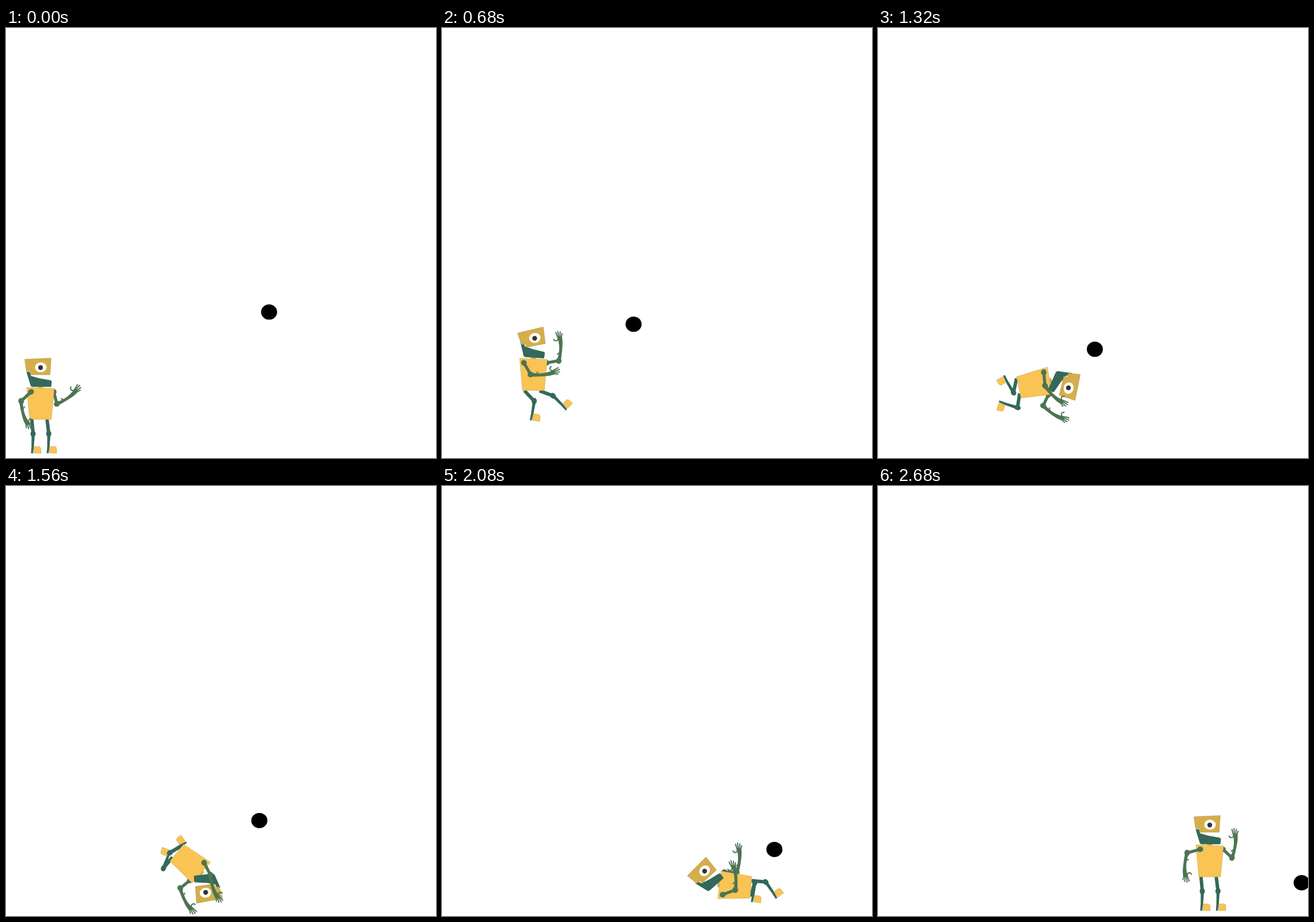
These frames come from a looping animation (748x748 px, 2720 ms). An HTML page:

```html
<!DOCTYPE html>
<html lang="en">
<head>
<meta charset="utf-8">
<title>Robot header</title>
<style>
html, body { margin: 0; width: 100%; height: 100%; overflow: hidden; background: #fff; }
svg { display: block; width: 100%; height: 100%; }
.arm { fill: #4d7452; }
.leg { fill: #34695a; }
.gold { fill: #f9c454; stroke: #b5a36c; stroke-width: .5; }
.head { fill: #d5ae4a; stroke: #a08c58; stroke-width: .5; }
.finger { fill: none; stroke: #4d7452; stroke-width: 2; stroke-linecap: round; stroke-linejoin: round; }
</style>
</head>
<body>
<svg viewBox="0 0 748 748">
  <defs>
    <g id="upper" class="arm">
      <ellipse rx="5.2" ry="4.8"/>
      <path d="M0-2.6H22V2.6H0z"/>
    </g>
    <g id="fore">
      <path class="arm" d="M-1-3.5Q8-1 12-.4L10-3 11.5-4 14.5 0Q24 1.2 34-1.2L40-3.5 43-1 42 4.5Q34 6.6 24 5.8Q8 5-2 3z"/>
      <ellipse class="arm" rx="5.4" ry="4.8"/>
      <path class="finger" d="M39-2L45-4.5 49-6M40-.5L46-1.8 51-2.6M41 1.5L46 1.4 50 1.6M40 3.5L44 4.2 47 5M38-1.5Q33-4 35-8L37-9.5"/>
    </g>
    <path id="thigh" class="leg" d="M-1-3H23V3H-1z"/>
    <g id="shin">
      <path class="leg" d="M0-3L23-2.2 34-.8V2.4L22 2 0 2.6z"/>
      <ellipse class="leg" rx="5.5" ry="4.5"/>
      <path class="gold" d="M22-2.2L21.6-11Q22-14 25.5-14.6L33.5-15V-2z"/>
    </g>
  </defs>
  <g id="robot"></g>
  <ellipse id="ball" rx="14" ry="13.3"/>
</svg>
<script>
const LOOP = 2720, STEP = 40, HIT = 960, NS = "http://www.w3.org/2000/svg";
const robot = document.getElementById("robot"), ball = document.getElementById("ball");

// Key poses. body: x, y, turn. neck: jaw tilt, head tilt.
// Limbs: direction of both halves, measured from the torso.
const legs = { nearLeg: [85, 92], farLeg: [83, 92] };
const level = { neck: [0, 0] };
const poses = [
  { t: 0, body: [60, 654, 0], ...level, ...legs, nearArm: [137, 73], farArm: [75, -36] },
  { t: 320, body: [60, 669, 0], ...level, nearLeg: [14, 102], farLeg: [17, 92], nearArm: [167, 55], farArm: [165, 61] },
  { t: 560, body: [118, 650, 8], nearLeg: [107, 102], farLeg: [62, 87] },
  { t: 680, body: [159, 603.5, 0], neck: [4, -11], nearLeg: [47, 99], farLeg: [20, 45], nearArm: [60, -7], farArm: [-10, -89] },
  { t: HIT, body: [214, 560, 16] },
  { t: 1080, body: [224.5, 584, 27], neck: [29, 9], nearLeg: [28, 126], farLeg: [41, 77], nearArm: [79, -12], farArm: [63, -25] },
  { t: 1560, body: [318, 655, 129], neck: [44, 43], nearLeg: [20, 197], farLeg: [0, 162], nearArm: [-66, -58], farArm: [12, -67] },
  { t: 2080, body: [510.5, 696, 274.4], neck: [44, 43], nearLeg: [12, 183], farLeg: [91, 141], nearArm: [65, -10], farArm: [88, 0] },
  { t: 2400, body: [577, 653, 360], ...level, ...legs },
  { t: LOOP - STEP, nearArm: [165, 93], farArm: [43, -83] }
];

function part(markup) {
  const g = document.createElementNS(NS, "g");
  g.innerHTML = markup;
  return robot.appendChild(g);
}
const use = id => part(`<use href="#${id}"/>`);
const arm = (name, x, y, size) => ({ name, x, y, size, a: use("upper"), b: use("fore") });
const leg = (name, x, y) => ({ name, x, y, size: 24, a: use("thigh"), b: use("shin") });

// Back to front
const limbs = [arm("farArm", 23, -21, 21.5), leg("farLeg", 11.5, 28), leg("nearLeg", -15, 28)];
const torso = part('<path class="head" d="M-4-31H4V-26H-4z"/><path class="gold" d="M-24-29L24-27 19 27H-19z"/>');
const jaw = part('<path class="leg" d="M-22-16H-16L-14-9 0-5 20-1.5Q22-1 22 2L21 10H-11Q-14 10-15 7z"/>');
const head = part('<path class="head" d="M-23-14L23-16 21 13-13 13V7H-20z"/>' +
  '<ellipse cx="5" rx="10" ry="8.6" fill="#fff"/><circle cx="4.6" cy=".5" r="4.2" fill="#333"/>');
limbs.push(arm("nearArm", -16.5, -21, 23.5));

// Linear blend between the neighbouring poses that set this value
function pose(name, t) {
  const keys = poses.filter(p => p[name]);
  const next = keys.find(p => p.t > t);
  const last = keys.filter(p => p.t <= t).pop();
  if (!next) return last[name];
  const k = (t - last.t) / (next.t - last.t);
  return last[name].map((v, i) => v + (next[name][i] - v) * k);
}

function place(el, x, y, turn) {
  el.setAttribute("transform", `translate(${x.toFixed(2)} ${y.toFixed(2)}) rotate(${turn.toFixed(2)})`);
}

function polar(x, y, deg, r) {
  const a = deg * Math.PI / 180;
  return [x + r * Math.cos(a), y + r * Math.sin(a)];
}

function draw(t) {
  const [cx, cy, turn] = pose("body", t);
  const [jawTilt, headTilt] = pose("neck", t);
  const toStage = (x, y) => polar(...polar(cx, cy, turn, x), turn + 90, y);

  place(torso, cx, cy, turn);
  // Tilting the jaw pushes jaw and head forward
  place(jaw, ...toStage(-2.5 + .15 * jawTilt, -39.8 - .08 * jawTilt), turn + jawTilt);
  place(head, ...toStage(-4.5 + .53 * jawTilt, -63.8 + .11 * jawTilt), turn + headTilt);

  for (const { name, x, y, size, a, b } of limbs) {
    const [first, second] = pose(name, t);
    const joint = toStage(x, y);
    place(a, ...joint, turn + first);
    place(b, ...polar(...joint, turn + first, size), turn + second);
  }

  // Steady flight, deflected at the header
  const s = t - HIT;
  place(ball, 282 + s * (s < 0 ? -.183 : .2645), 524 + s * (s < 0 ? .0312 : .0966), 0);
}

const start = performance.now();
function tick() {
  const t = (performance.now() - start) % LOOP;
  draw(Math.floor(t / STEP) * STEP);
  requestAnimationFrame(tick);
}
tick();
</script>
</body>
</html>
```
